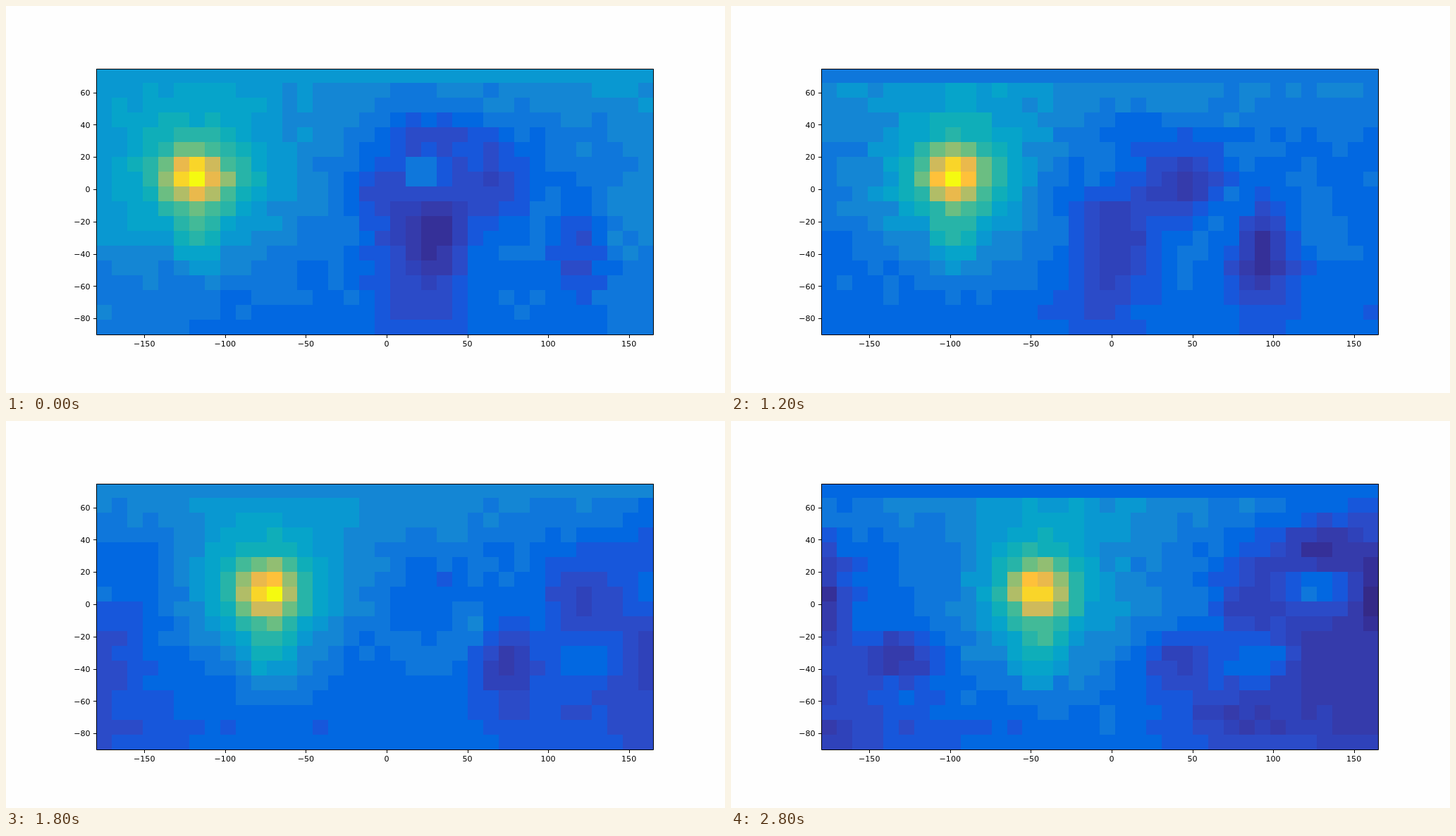
Recreate the animation shown at these times as an HTML page with a canvas. Size 1020 px wide and 549 px high, loop 3 s.

```html
<!DOCTYPE html>
<html lang="en">
<head>
<meta charset="utf-8">
<title>Heat map</title>
<style>
  html, body { margin: 0; width: 100%; height: 100%; overflow: hidden; background: #fefefe; }
  canvas, svg { position: absolute; left: 0; top: 0; display: block; }
  text { font: 11.11px "DejaVu Sans", sans-serif; fill: #000; }
  .x { text-anchor: middle; }
  .y { text-anchor: end; }
  path { fill: none; stroke: #000; stroke-width: 1; }
</style>
</head>
<body>
<canvas id="field" width="1020" height="549"></canvas>
<svg id="axes" width="1020" height="549" viewBox="0 0 1020 549"></svg>
<script>
const COLS = 36, ROWS = 18, STEP = 200, STEPS = 15;
const DRIFT = 1.35, LIFE = 2, END = 6;
const palette = ('#352a87 #353098 #353bab #2f42ba #2b4bc8 #1757db #0268e1 #0f77db ' +
  '#1486d4 #0998d1 #06a4ca #0faeb9 #27b4a8 #42ba98 #6bbe82 #92be72 #b1bd67 ' +
  '#cfba5b #eab94c #fec13a #f9d529 #f5fa10').split(' ');

// Patches drift left together, each swelling and fading around its peak time:
// column at time 0, row, width, height, strength, peak time
const patches = [
  [21.3, 10.3, 1.8, 2.2, -6, .7],
  [25.6, 7.3, 1.8, 1.8, -5.2, 1.4],
  [21.8, 4, 2.3, 1.4, -3, 0],
  [18, 7.8, 1.7, 2.3, -2.6, 0],
  [20.6, 14.4, 2, 2.3, -2.6, .8],
  [30.7, 11.8, 1.4, 2.5, -5.4, 1.6],
  [30.7, 11.6, 1.5, 1.4, -4.8, 5],
  [35.2, 7.3, 1.5, 2.2, -4, 4.8],
  [40, 4, 2.3, 1.4, -4.6, 6],
  [39.8, 11.3, 3.2, 3.2, -4.6, 5],
  [34.3, 15.3, 2.6, 1.3, -2.6, 6],
  [7.6, 7.2, 1.1, 2, -3.8, 6],
  [12.7, 11.2, 1.8, 1.1, -4.6, 6],
  [20.6, 6.7, .9, .8, 3.4, 0],
  [33.3, 9.7, 1.3, 1.5, 1.8, 1.5],
  [28.6, 9.2, .9, 1.2, 2, 2.4],
  [36.6, 11.2, 1.2, 1.3, 3.4, 5],
  [39.9, 6.5, 1.2, 1, 4, 5.6]
];

const clamp = (v, a, b) => Math.min(b, Math.max(a, v));
const lerp = (a, b, f) => a + (b - a) * f;
const smooth = p => p * p * (3 - 2 * p);
const bell = d => Math.exp(-d * d);

function hash(a, b, c) {
  let h = Math.imul(a + 11, 374761393) ^ Math.imul(b + 7, 668265263) ^ Math.imul(c + 3, 1274126177);
  h = Math.imul(h ^ (h >>> 13), 1103515245);
  return ((h ^ (h >>> 16)) >>> 0) / 4294967296 - .5;
}

// Parabola through left, middle and right values
const bow = (l, m, r, s) => l * (1 - s) * (1 - 2 * s) + 4 * m * s * (1 - s) + r * s * (2 * s - 1);

// Columns are longitudes, so distances wrap around
const wrap = d => d - COLS * Math.round(d / COLS);

const bump = (c, r, [x, y, w, h, amp]) =>
  amp * Math.exp(-((wrap(c - x) / w) ** 2 + ((r - y) / h) ** 2) / 2);

// The drift begins slowly, then runs evenly
const timeAt = k => k < 4 ? (k / 4) ** 3 : k / 2 - 1;

// The polar row is uniform and changes in whole levels
const polar = k => k < 5 ? 9 : k < 9 ? 7 : 8 - Math.floor((k - 9) / 2);

function ground(c, r, u) {
  const s = c / (COLS - 1), edge = 7.2 - .65 * u;
  const up = clamp(1 - r / 4.5, 0, 1), low = clamp((r - 11) / 5, 0, 1);
  const main = bow(7.8 - .33 * u, 7, 7.2 - .4 * u, s) + 1.3 * up;
  return lerp(main, bow(edge, 6, edge, s), low);
}

function hotSpot(u) {
  const p = u / END, x = 5.9 + 7.6 * lerp(p, smooth(p), .6), y = 6.8;
  return [
    [x, y, 1.25, 1.15, 8.6],
    [x, y, 3.2 - .1 * u, 3, 4.5],
    [x + 1.5, 5.5, 5, 4, 1.2],
    [x, 11, 1, 1.5, 2.6]
  ];
}

const ctx = document.getElementById('field').getContext('2d');
const colX = c => Math.round(128 + c * 790.5 / COLS);
const rowY = r => Math.max(89, Math.round(88.4 + r * 377.7 / ROWS));

function draw(k) {
  const u = timeAt(k), i = Math.floor(u);
  const bumps = patches.map(([x, y, w, h, amp, peak]) =>
    [x - DRIFT * u, y, w, h, amp * bell((u - peak) / LIFE)]).concat(hotSpot(u));
  for (let r = 0; r < ROWS; r++) {
    const grain = r === ROWS - 1 ? .4 : 1;
    for (let c = 0; c < COLS; c++) {
      let v = ground(c, r, u) + grain * lerp(hash(c, r, i), hash(c, r, i + 1), u - i);
      for (const b of bumps) v += bump(c, r, b);
      if (r === 0) v = polar(k);
      ctx.fillStyle = palette[clamp(Math.round(v), 0, palette.length - 1)];
      ctx.fillRect(colX(c), rowY(r), colX(c + 1) - colX(c), rowY(r + 1) - rowY(r));
    }
  }
}

function drawAxes() {
  let lines = 'M128.5 89.5H918.5V466.5H128.5Z', labels = '';
  const name = v => String(v).replace('-', '\u2212');
  for (let v = -150; v <= 150; v += 50) {
    const x = 127.5 + (v + 180) * 790.5 / 345;
    lines += `M${Math.round(x) + .5} 467v4`;
    labels += `<text class="x" x="${x}" y="482.5">${name(v)}</text>`;
  }
  for (let v = -80; v <= 60; v += 20) {
    const y = 466.2 - (v + 90) * 2.2913;
    lines += `M128 ${Math.round(y) + .5}h-4`;
    labels += `<text class="y" x="119.7" y="${y + 4.2}">${name(v)}</text>`;
  }
  document.getElementById('axes').innerHTML = `<path d="${lines}"/>${labels}`;
}

let shown = -1;
function tick() {
  const k = Math.floor(performance.now() / STEP) % STEPS;
  if (k !== shown) draw(shown = k);
  requestAnimationFrame(tick);
}
drawAxes();
tick();
</script>
</body>
</html>
```
